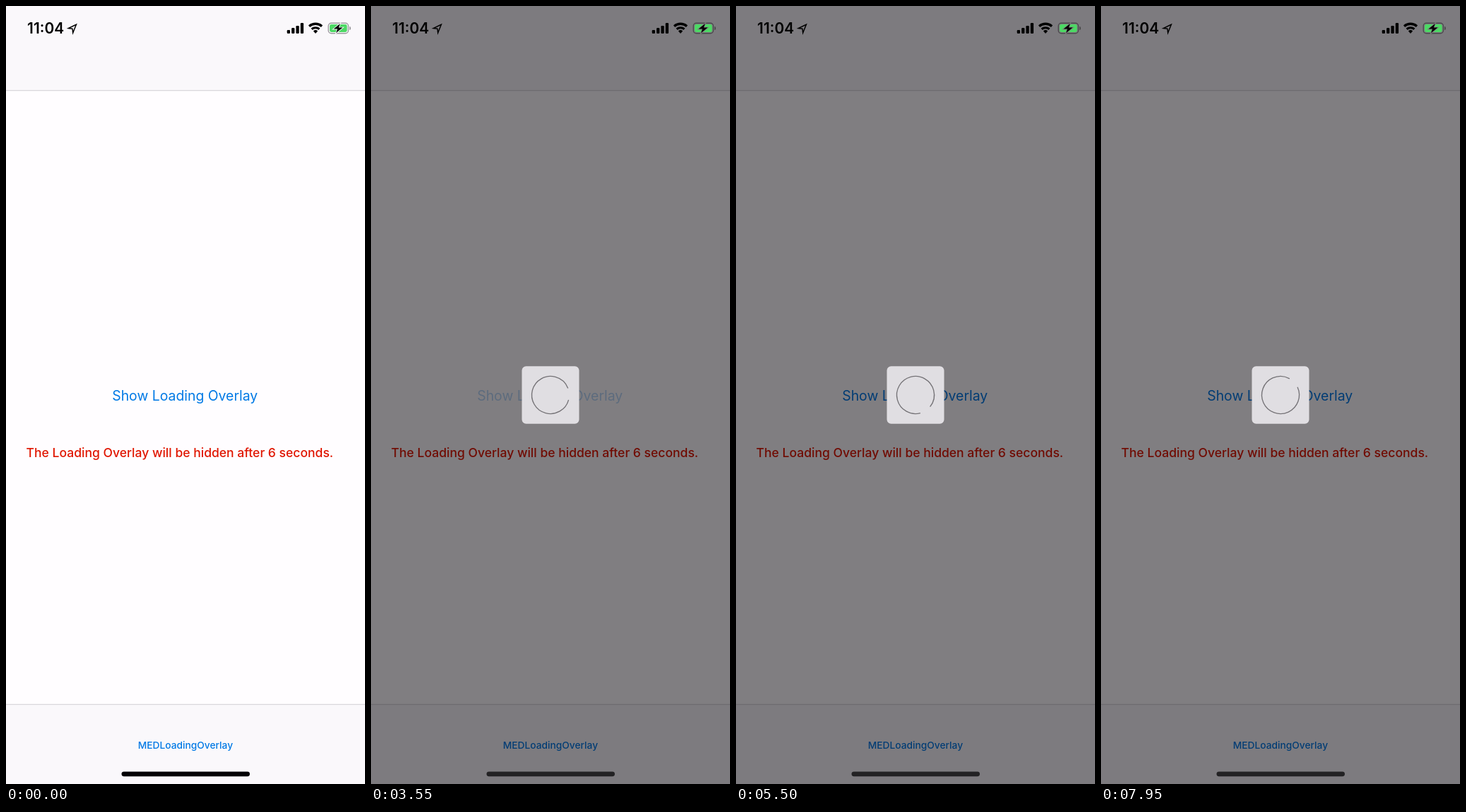
Animation of 508 by 1102 pixels, one loop 8000 ms. Source, as an HTML page with a canvas:

```html
<!DOCTYPE html>
<html lang="en">
<head>
<meta charset="utf-8">
<title>Loading overlay</title>
<style>
  html, body { margin: 0; width: 100%; height: 100%; overflow: hidden; background: #fffdff; }
  canvas { display: block; width: 508px; height: 1102px; }
</style>
</head>
<body>
<canvas id="stage" width="508" height="1102"></canvas>
<script>
const WIDTH = 508, HEIGHT = 1102;
const LOOP = 8000, STEP = 50;
const OVERLAY_START = 3550, TURN = 900, FADE = 400;
const BLUE = '#0079e5', RED = '#e01600';
const PAGE = '#fffdff', BAR = '#faf8fb', LINE = '#dad8dc';
const RAD = Math.PI / 180;

const ctx = document.getElementById('stage').getContext('2d');

function rect(x, y, w, h, color) {
  ctx.fillStyle = color;
  ctx.fillRect(x, y, w, h);
}

function roundPath(x, y, w, h, r) {
  ctx.beginPath();
  ctx.roundRect(x, y, w, h, r);
}

function fillRound(x, y, w, h, r, color) {
  roundPath(x, y, w, h, r);
  ctx.fillStyle = color;
  ctx.fill();
}

function polygon(points) {
  ctx.beginPath();
  points.forEach(([x, y]) => ctx.lineTo(x, y));
  ctx.closePath();
}

function text(label, x, y, size, weight, color, align = 'center') {
  ctx.font = `${weight} ${size}px Inter, sans-serif`;
  ctx.textAlign = align;
  ctx.fillStyle = color;
  ctx.fillText(label, x, y);
}

function drawPage(buttonAlpha) {
  rect(0, 0, WIDTH, HEIGHT, PAGE);
  rect(0, 0, WIDTH, 119, BAR);
  rect(0, 119, WIDTH, 1.3, LINE);
  rect(0, 989, WIDTH, HEIGHT - 989, BAR);
  rect(0, 988.7, WIDTH, 1.3, LINE);

  ctx.globalAlpha = buttonAlpha;
  text('Show Loading Overlay', 253.2, 558.5, 19.4, 400, BLUE);
  ctx.globalAlpha = 1;
  text('The Loading Overlay will be hidden after 6 seconds.', 28.6, 639, 17.55, 500, RED, 'left');
  text('MEDLoadingOverlay', 253.9, 1051.5, 13.75, 500, BLUE);
}

function drawWifi(x, y) {
  const from = -131 * RAD, to = -49 * RAD;
  for (const [inner, outer] of [[0, 4.8], [6.7, 9.8], [12, 15.4]]) {
    ctx.beginPath();
    ctx.arc(x, y, outer, from, to);
    ctx.arc(x, y, inner, to, from, true);
    ctx.fill();
  }
}

function drawBattery(background, outline) {
  ctx.lineWidth = 1.4;
  ctx.strokeStyle = outline;
  roundPath(456.2, 24.2, 28.2, 14.6, 4);
  ctx.stroke();
  fillRound(486, 29, 1.8, 5, [0, 2, 2, 0], outline);
  fillRound(458, 26, 24.6, 11, 2.4, '#4cd964');

  polygon([[472.8, 25], [463.5, 32.6], [469, 32.6], [467, 38.3], [476.5, 30.5], [470.8, 30.5]]);
  ctx.strokeStyle = background;
  ctx.lineWidth = 1.7;
  ctx.stroke();
  ctx.fillStyle = '#000';
  ctx.fill();
}

function drawStatusBar(dimmed) {
  text('11:04', 30.1, 39, 20.9, 600, '#000', 'left');

  polygon([[99.4, 26.2], [88.3, 31.5], [94, 32.2], [94.7, 38]]);
  ctx.strokeStyle = '#000';
  ctx.lineWidth = 1.5;
  ctx.stroke();

  [5, 8, 11, 15].forEach((h, i) => fillRound(397.7 + i * 6.35, 39 - h, 4.3, h, 1.2, '#000'));
  drawWifi(438, 39);
  drawBattery(dimmed ? '#7e7c7f' : BAR, dimmed ? '#4b4a4c' : '#9a999c');
}

function drawSpinner(elapsed) {
  fillRound(213.5, 510.3, 81, 81.4, 6, '#e0dee2');
  const start = (15 + 360 * elapsed / TURN) * RAD;
  ctx.beginPath();
  ctx.arc(254, 551, 26.5, start, start + 324 * RAD);
  ctx.strokeStyle = '#747276';
  ctx.lineWidth = 1.35;
  ctx.stroke();
}

function draw(time) {
  const elapsed = time - OVERLAY_START;
  const dimmed = elapsed >= 0;
  const p = Math.min(1, Math.max(0, elapsed / FADE));
  const eased = p * p * (3 - 2 * p);

  drawPage(dimmed ? 0.28 + 0.72 * eased : 1);
  if (dimmed) {
    rect(0, 0, WIDTH, HEIGHT, 'rgba(3, 0, 4, 0.5)');
    drawSpinner(elapsed);
  }
  drawStatusBar(dimmed);
  fillRound(163.5, 1084.4, 181.5, 6.8, 3.4, dimmed ? '#232224' : '#030204');
}

const origin = performance.now();

function tick() {
  const time = (performance.now() - origin) % LOOP;
  draw(Math.floor(time / STEP) * STEP);
  requestAnimationFrame(tick);
}

tick();
</script>
</body>
</html>
```
